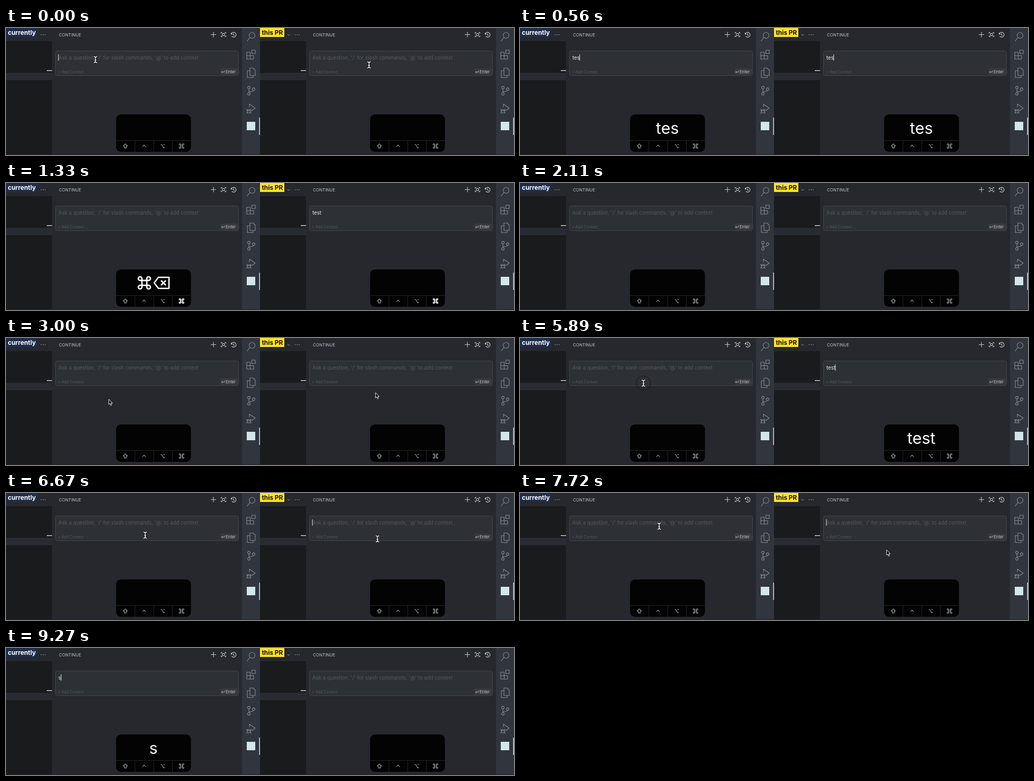
These frames come from a looping animation (960x241 px, 9370 ms). An HTML page with a canvas:

```html
<!DOCTYPE html>
<html lang="en">
<head>
<meta charset="utf-8">
<title>Input focus comparison</title>
<style>
  html, body { margin: 0; width: 100%; height: 100%; overflow: hidden; background: #26282d; }
  canvas { display: block; }
</style>
</head>
<body>
<canvas id="stage" width="960" height="241"></canvas>
<script>
const LOOP = 9370, KEY_STEP = 150, SHORTCUT = 380, BLINK = 500, TRAVEL = 890, RING = 220;
const FONT = 'Inter, "Liberation Sans", sans-serif';
const ctx = document.getElementById('stage').getContext('2d');

// Small SVG path builders.
const box = (x, y, w, h = w) => `M${x} ${y}h${w}v${h}h${-w}z`;
const ring = (x, y, r) => `M${x + r} ${y}a${r} ${r} 0 1 1 ${-2 * r} 0a${r} ${r} 0 1 1 ${2 * r} 0`;
const corners = draw => [-1, 1].flatMap(x => [-1, 1].map(y => draw(x, y))).join('');

const ICONS = {
  plus: 'M-5 0H5M0-5V5',
  expand: box(-2, -2, 4) + corners((x, y) => `M${2 * x} ${4 * y}H${4.5 * x}V${2 * y}`),
  history: 'M-4.5-3.5V-.8H-1.8M-4.2-1A4.6 4.6 0 1 1-3.3 3.2M0-2.5V.5L2 2',
  chevron: 'M-2.5-1L0 1L2.5-1',
  search: ring(2, -3, 5.5) + 'M-2 1L-7.5 8',
  extensions: box(-8, -5, 6.5) + box(-8, 1.5, 6.5) + box(-1.5, 1.5, 6.5) + box(1.5, -9, 6.5),
  files: 'M-2-9H4L8-5V5H-2ZM-2-4H-7V9H4V5',
  branch: ring(-4, -6, 2.4) + ring(-4, 6, 2.4) + ring(5, -3, 2.4) + 'M-4-3.6V3.6M5-.6Q4 2-4 2',
  debug: 'M-3-3V-8.5L8-1L1 4M-8 4H0' + ring(-4, 5, 3.2) + corners((x, y) => `M${-4 + 2.5 * x} ${5 + 2 * y}l${2 * x} ${2 * y}`),
  shift: 'M0-4.5L4.5 0H2V4H-2V0H-4.5Z',
  control: 'M-3.5 1.5L0-2L3.5 1.5',
  option: 'M-4.5-3H-2L1.5 3.5H4.5M1-3H4.5',
  command: box(-2, -2, 4) + corners((x, y) =>
    `M${2 * x} ${2 * y}V${3.5 * y}A1.5 1.5 0 1 ${x * y > 0 ? 0 : 1} ${3.5 * x} ${2 * y}Z`),
  backspace: 'M-6-10.5H14V10.5H-6L-14 0ZM-1-4.5L8 4.5M8-4.5L-1 4.5',
  enter: 'M3-2.5V.8H-3M-1-1.2L-3 .8L-1 2.8',
  arrow: 'M0 0V10L2.3 8L4 12L5.5 11L4 7.5H7Z',
  beam: 'M-3-6L0-4.5L3-6M0-4.5V4.5M-3 6L0 4.5L3 6M-1.5 1H1.5'
};
for (const name in ICONS) ICONS[name] = new Path2D(ICONS[name]);

// A session runs: focus, type a word, erase it with the shortcut, lose focus.
// The pointer hides on typing and is back at `pointer`. Stops are [arrival, x, y].
const panels = [
  {
    x: 0, label: 'currently', labelWidth: 59, labelFill: '#1d2d4b', labelInk: '#fff',
    sessions: [
      { focus: 0, word: 'test', type: 120, erase: 1330, blur: 1330, pointer: 2280 },
      { focus: 8500, word: 's', type: 9110, erase: Infinity, blur: LOOP, pointer: LOOP }
    ],
    stops: [[0, 169, 60], [2280, 191, 120], [3680, 214, 86], [5720, 232, 86], [6670, 263, 80], [7720, 263, 63]],
    clicks: [4610, 5780, 8440], leave: LOOP
  },
  {
    x: 480, label: 'this PR', labelWidth: 46, labelFill: '#ffe12e', labelInk: '#111',
    sessions: [
      { focus: 170, word: 'test', type: 170, erase: 1560, blur: 2560, pointer: 2280 },
      { focus: 3890, word: 'test', type: 5000, erase: 6280, blur: LOOP, pointer: 6560 }
    ],
    stops: [[0, 206, 70], [2280, 215, 133], [3350, 220, 87], [6560, 222, 87], [8000, 210, 113]],
    clicks: [2560], leave: 8500
  }
];

const clamp = (value, low, high) => Math.min(high, Math.max(low, value));
const ease = k => k * k * (3 - 2 * k);

function inputState(sessions, t) {
  const s = sessions.findLast(session => t >= session.focus) ?? sessions[0];
  const letters = clamp(Math.floor((t - s.type) / KEY_STEP) + 1, 0, s.word.length);
  const typed = s.word.slice(0, letters);
  const lastEdit = t >= s.erase ? s.erase : letters ? s.type + (letters - 1) * KEY_STEP : s.focus;
  return {
    text: t < s.erase ? typed : '',
    keys: t < s.erase - SHORTCUT * .63 ? typed : '',
    command: Math.abs(t - s.erase) < SHORTCUT,
    erasing: t >= s.erase && t < s.erase + SHORTCUT,
    caret: t >= s.focus && t < s.blur && (t - lastEdit) % (2 * BLINK) < BLINK,
    pointerHidden: t >= s.type && t < s.pointer
  };
}

function pointerAt(stops, t) {
  let [, x, y] = stops[0];
  for (const [arrival, toX, toY] of stops.slice(1)) {
    const k = ease(clamp((t - arrival) / TRAVEL + 1, 0, 1));
    x += (toX - x) * k;
    y += (toY - y) * k;
  }
  return [x, y];
}

function rect(x, y, w, h, fill, radius = 0, border) {
  ctx.beginPath();
  ctx.roundRect(x, y, w, h, radius);
  ctx.fillStyle = fill;
  ctx.fill();
  if (border) {
    ctx.strokeStyle = border;
    ctx.lineWidth = 1;
    ctx.stroke();
  }
}

function write(text, x, y, size, color, weight = 400, align = 'left') {
  ctx.font = `${weight} ${size}px ${FONT}`;
  ctx.textAlign = align;
  ctx.fillStyle = color;
  ctx.fillText(text, x, y);
}

function icon(name, x, y, color, width = 1, scale = 1, fill) {
  ctx.save();
  ctx.translate(x, y);
  ctx.scale(scale, scale);
  ctx.lineWidth = width / scale;
  ctx.lineJoin = 'round';
  ctx.strokeStyle = color;
  if (fill) {
    ctx.fillStyle = fill;
    ctx.fill(ICONS[name]);
  }
  ctx.stroke(ICONS[name]);
  ctx.restore();
}

function drawChrome(panel) {
  rect(0, 0, 480, 241, '#26282d');
  rect(0, 25, 87, 216, '#1a1b1d');
  rect(0, 85, 87, 14, '#282b32');
  rect(77, 80, 10, 1.5, '#c9cbce');

  rect(0, 0, panel.labelWidth, 17, panel.labelFill);
  write(panel.label, 3.5, 12.5, 11.8, panel.labelInk, 700);
  for (let i = -1; i <= 1; i++) rect(69.5 + i * 3.7, 12, 1.5, 1.5, '#b8bbc0', 1);
  if (panel.x) icon('chevron', 54, 13, '#92959b');

  write('CONTINUE', 100, 15.5, 8, '#bfc2c7');
  ['plus', 'expand', 'history'].forEach((name, i) => icon(name, 392 + i * 19, 12.5, '#c3c6ca', 1.1));

  rect(446, 0, 34, 241, '#31353e');
  ['search', 'extensions', 'files', 'branch', 'debug'].forEach((name, i) =>
    icon(name, 463, 17 + i * 34, '#858a93', 1.1));
  rect(455, 178, 16, 16, '#d3e6ec');
  rect(478.5, 170, 1.5, 33, '#c5e3ee');
}

function drawInput({ text, caret }) {
  rect(93.5, 43.5, 346, 47, '#2d3035', 3, '#404349');
  if (text) write(text, 99, 59.5, 9.6, '#eceef0');
  else write("Ask a question, '/' for slash commands, '@' to add context", 99, 59.5, 9.63, '#565960');
  if (caret) {
    ctx.font = `400 9.6px ${FONT}`;
    rect(98.6 + ctx.measureText(text).width, 50, 1, 12, '#e0e2e5');
  }
  write('+ Add Context', 98, 86, 7.1, '#55585e');
  rect(405, 77, 33, 12, '#383a40', 3);
  icon('enter', 410, 83, '#b5b8bd', .9, .9);
  write('Enter', 415, 86, 7.7, '#c3c5c9');
}

function drawKeyboard({ keys, command, erasing }) {
  rect(208, 164, 141.5, 71, '#030303', 9);
  rect(208, 213, 141.5, 1, '#242424');
  ['shift', 'control', 'option', 'command'].forEach((name, i) => {
    const held = command && name === 'command';
    if (i) rect(207.8 + i * 35.4, 213, 1, 22, '#242424');
    icon(name, 225.5 + i * 35.4, 224, held ? '#fff' : '#9b9ea1', held ? 1.4 : 1.1, .9);
  });
  if (erasing) {
    icon('command', 261.5, 189.5, '#fff', 2.6, 2.3);
    icon('backspace', 294, 189.5, '#fff', 2.6);
  }
  write(keys, 278.5, 201, 30.5, '#fff', 400, 'center');
}

function drawPointer(panel, t) {
  const [x, y] = pointerAt(panel.stops, t);
  if (panel.clicks.some(click => t >= click && t < click + RING)) {
    ctx.beginPath();
    ctx.arc(x, y, 13.5, 0, Math.PI * 2);
    ctx.strokeStyle = '#17181b';
    ctx.lineWidth = 1;
    ctx.stroke();
  }
  if (y > 43 && y < 91) {
    icon('beam', x, y, '#111', 3.4);
    icon('beam', x, y, '#f2f2f2', 1.5);
  } else {
    icon('arrow', x, y + 1, '#e8e8e8', 1, 1, '#0b0b0c');
  }
}

function frame(now) {
  const t = now % LOOP;
  for (const panel of panels) {
    const state = inputState(panel.sessions, t);
    ctx.save();
    ctx.translate(panel.x, 0);
    drawChrome(panel);
    drawInput(state);
    drawKeyboard(state);
    if (!state.pointerHidden && t < panel.leave) drawPointer(panel, t);
    ctx.restore();
  }
  rect(0, 240, 960, 1, '#2b1c24');
  requestAnimationFrame(frame);
}
frame(performance.now());
</script>
</body>
</html>
```
